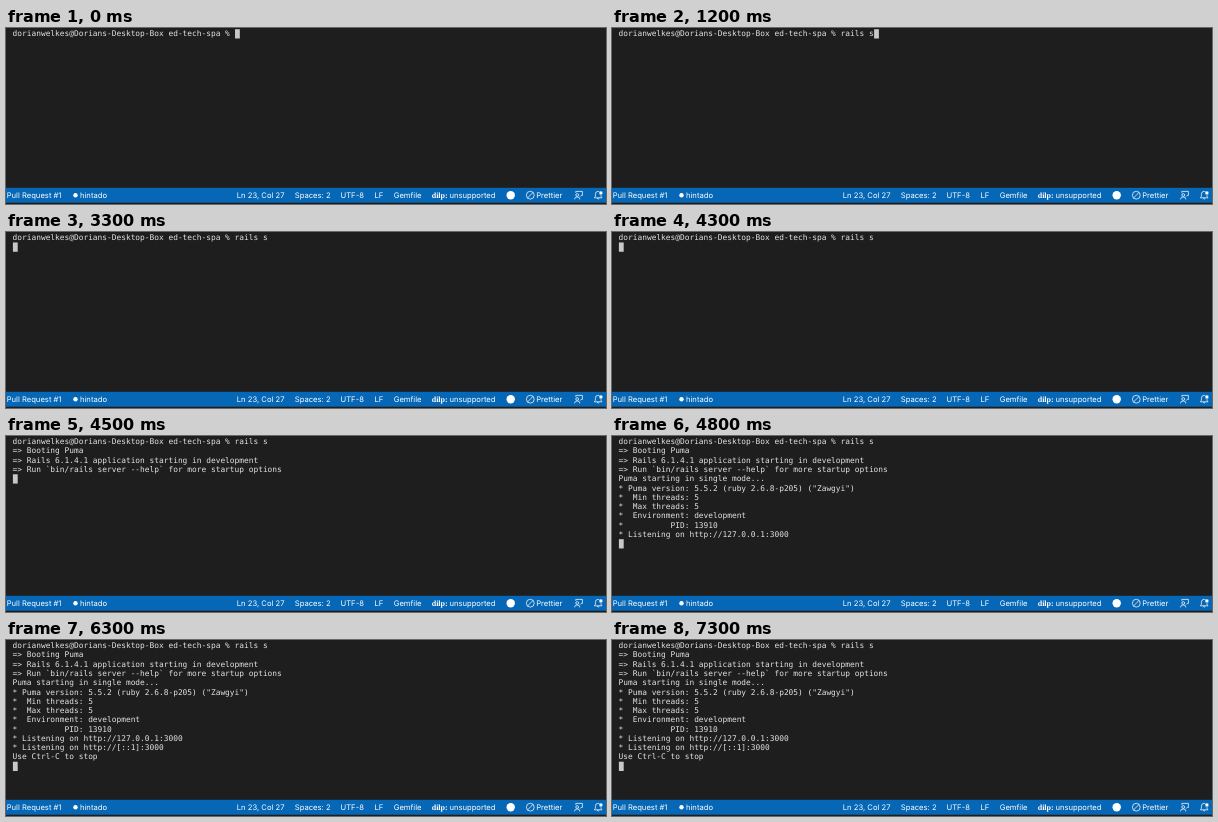
These frames come from a looping animation (600x176 px, 8 s). An HTML page:

```html
<!DOCTYPE html>
<html lang="en">
<head>
<meta charset="utf-8">
<title>Rails server in a terminal</title>
<style>
  html, body { margin: 0; width: 100%; height: 100%; overflow: hidden; background: #1e1e1e; }
  svg { display: block; width: 600px; height: 176px; }
  text { white-space: pre; text-rendering: geometricPrecision; }
  #terminal { font: 7.85px "DejaVu Sans Mono", monospace; fill: #e2e2e2; }
  #status { font: 7.65px Inter, sans-serif; fill: #fff; }
  .serif { font: bold 8px "Liberation Serif", serif; }
  .icon { fill: none; stroke: #fff; stroke-width: .75; stroke-linejoin: round; }
</style>
</head>
<body>
<svg viewBox="0 0 600 176">
  <rect width="600" height="176" fill="#1e1e1e"/>
  <g id="terminal"></g>
  <rect id="cursor" width="4.8" height="9.3" fill="#c8c8c8"/>
  <rect y="159.8" width="600" height="14.9" fill="#0567b6"/>
  <g id="status">
    <text class="serif" x="425.7" y="170">dilp:</text>
    <circle cx="69.5" cy="167.3" r="2.2"/>
    <circle cx="504.7" cy="167.2" r="4.2"/>
    <g class="icon">
      <circle cx="524.3" cy="167.2" r="3.9"/>
      <path d="M521.6 169.9 L527 164.5"/>
      <circle cx="571.2" cy="167" r="1.4"/>
      <path d="M568.6 171.4 V171 Q568.6 169 571.2 169 Q573.8 169 573.8 171 V171.4"/>
      <path d="M569.8 164.8 V163.4 H576.4 V167.4 H575.2 L574 168.6"/>
      <path d="M588.4 169.8 L589.4 168.3 V166.3 Q589.4 163.3 592.2 163.3 Q595 163.3 595 166.3 V168.3 L596 169.8 Z"/>
      <path d="M591.1 170.2 Q592.2 172.1 593.3 170.2"/>
    </g>
    <circle cx="594.9" cy="164.9" r="2" stroke="#0567b6" stroke-width=".6"/>
  </g>
</svg>
<script>
  const LOOP = 8000, LEFT = 6.6, CHAR = 4.726, ROW = 9.27;
  const prompt = "dorianwelkes@Dorians-Desktop-Box ed-tech-spa % ";
  const command = prompt + "rails s";
  const output = [
    "=> Booting Puma",
    "=> Rails 6.1.4.1 application starting in development",
    "=> Run `bin/rails server --help` for more startup options",
    "Puma starting in single mode...",
    '* Puma version: 5.5.2 (ruby 2.6.8-p205) ("Zawgyi")',
    "*  Min threads: 5",
    "*  Max threads: 5",
    "*  Environment: development",
    "*          PID: 13910",
    "* Listening on http://127.0.0.1:3000",
    "* Listening on http://[::1]:3000",
    "Use Ctrl-C to stop"
  ];
  // Start time in ms and the lines on screen; the cursor follows the last one.
  const steps = [
    [0, [prompt]],
    [600, [command]],
    [1800, [command, ""]],
    ...[[4500, 3], [4800, 10], [4900, 12]].map(
      ([start, count]) => [start, [command, ...output.slice(0, count), ""]])
  ];

  const terminal = document.getElementById("terminal");
  const cursor = document.getElementById("cursor");
  const status = document.getElementById("status");

  function addText(parent, x, y, content = "") {
    const node = document.createElementNS("http://www.w3.org/2000/svg", "text");
    node.setAttribute("x", x);
    node.setAttribute("y", y);
    node.textContent = content;
    return parent.appendChild(node);
  }

  [
    [0.7, "Pull Request #1"], [74, "hintado"], [230.8, "Ln 23, Col 27"],
    [288.8, "Spaces: 2"], [334.5, "UTF-8"], [368.5, "LF"], [387.7, "Gemfile"],
    [443.4, "unsupported"], [530.2, "Prettier"]
  ].forEach(([x, label]) => addText(status, x, 169.9, label));

  const rows = Array.from({ length: output.length + 2 },
    (_, i) => addText(terminal, LEFT, 8.2 + i * ROW));

  let shown = null;
  function render(time) {
    const lines = steps.filter(([start]) => start <= time).pop()[1];
    if (lines === shown) return;
    shown = lines;
    rows.forEach((row, i) => { row.textContent = lines[i] || ""; });
    const last = lines.length - 1;
    cursor.setAttribute("x", LEFT + 0.3 + lines[last].length * CHAR);
    cursor.setAttribute("y", 1.2 + last * ROW);
  }

  const origin = performance.now();
  function tick() {
    render((performance.now() - origin) % LOOP);
    requestAnimationFrame(tick);
  }
  tick();
</script>
</body>
</html>
```
